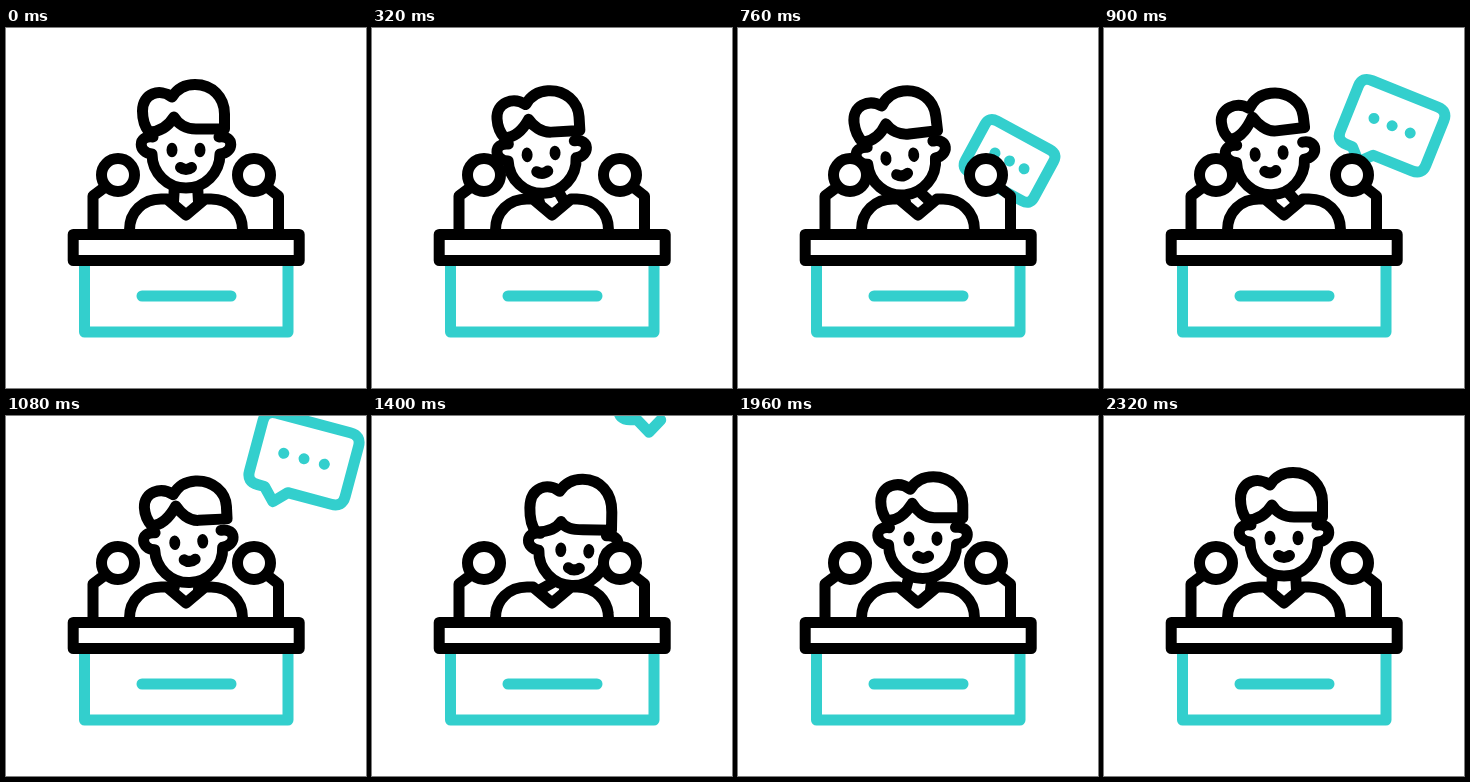
An HTML page for the animation above (2400 ms loop, 360 px wide and 360 px high).

```html
<!DOCTYPE html>
<html lang="en">
<head>
<meta charset="utf-8">
<title>Speaker at a podium</title>
<style>
html, body { margin: 0; width: 100%; height: 100%; overflow: hidden; background: #fff; }
svg { display: block; width: 100vw; height: 100vh; }
path, circle, rect { fill: #fff; stroke: #000; stroke-width: 11; stroke-linecap: round; stroke-linejoin: round; vector-effect: non-scaling-stroke; }
.teal { stroke: #33cfcd; }
.line { fill: none; }
.solid ellipse { fill: #000; }
</style>
</head>
<body>
<svg viewBox="0 0 360 360">
  <g id="bubble">
    <path id="frame" class="teal" d="M-38-37H38Q49.500-37 49.500-26V26Q49.500 37 38 37H-7L-19 49.500L-31 37H-38Q-49.500 37-49.500 26V-26Q-49.500-37-38-37"/>
    <path class="teal line" d="M-21 0h.01M0 0h.01M21 0h.01"/>
  </g>
  <path d="M123.500 206V202C123.500 184 137 171 155 171H161L180 187L199 171H205C223 171 236.500 184 236.500 202V206"/>
  <path id="neck" class="line"/>
  <path id="head" d="M147 109C131 107 132 125 146 126A34 34 0 0 0 214 126C228 125 229 107 213 109"/>
  <g id="face" class="solid">
    <ellipse cx="166" cy="122" rx="5.5" ry="7.3"/>
    <ellipse cx="194" cy="122" rx="5.5" ry="7.3"/>
    <path class="line" d="M174.500 139.500Q180 143.500 185.500 139.500"/>
  </g>
  <path id="hair"/>
  <path class="line" d="M99 159L87 168V206M261 159L272.500 168V206"/>
  <circle cx="112" cy="147" r="16.500"/>
  <circle cx="248" cy="147" r="16.500"/>
  <path class="teal" d="M78.500 234V304H282V234"/>
  <path class="teal line" d="M136 268H225"/>
  <rect x="67.200" y="206.500" width="226" height="26"/>
</svg>
<script>
const LOOP = 2400;
const $ = id => document.getElementById(id);

// Smooth curve through keys that never overshoots them
function track(times, values) {
  const last = times.length - 1;
  const slope = i => (values[i + 1] - values[i]) / (times[i + 1] - times[i]);
  const tangent = i => {
    if (i === 0 || i === last) return 0;
    const a = slope(i - 1), b = slope(i);
    return a * b <= 0 ? 0 : 2 * a * b / (a + b);
  };
  return t => {
    if (t <= times[0]) return values[0];
    if (t >= times[last]) return values[last];
    let i = 0;
    while (t > times[i + 1]) i++;
    const h = times[i + 1] - times[i], u = (t - times[i]) / h, v = 1 - u;
    return v * v * (1 + 2 * u) * values[i] + u * u * (3 - 2 * u) * values[i + 1]
      + h * u * v * (v * tangent(i) - u * tangent(i + 1));
  };
}

const poses = [0, 280, 580, 900, 1080, 1400, 1680, 2220];
const pose = (...v) => track(poses, v);
const hairX = pose(0, -10, -22, -20, 1.5, 21.5, 16.5, 0);
const hairTurn = pose(0, -3, -6, -7, -3, 1, 0, 0);
const crownY = pose(0, 7, 4, 10, 9, 6.5, 9, 0);
const faceX = pose(0, -9, -19, -14.5, 3, 22.5, 14.5, 0);
const faceY = pose(0, 3, 11, 3.5, 4, 12.5, 3, 0);
const faceTurn = pose(0, -3, -12, -4, -3, 3, -1, 0);

const flight = [400, 580, 900, 1080, 1400, 1660];
const fly = (...v) => track(flight, v);
const bubbleX = fly(208, 242, 288, 298, 296, 292);
const bubbleY = fly(222, 176, 98, 43, -33, -100);
const bubbleTurn = fly(44, 37, 22, 15, 0, -8);
const bubbleSize = fly(0.1, 0.5, 0.93, 1, 1, 1);
const frameLength = $("frame").getTotalLength();

const place = (id, value) => $(id).setAttribute("transform", value);
const shape = (id, d) => $(id).setAttribute("d", d);

// Crown, fringe ends and fringe peak drop by different amounts in a nod
function hairPath(top, ends, peak) {
  const side = (top + ends) / 2;
  return `M143 ${104 + ends}C139 ${99 + ends} 136.5 ${92 + side} 136.5 ${83 + side}
    C136.5 ${65 + top} 154 ${60 + top} 166 ${69 + top}
    C171 ${61 + top} 179 ${56.5 + top} 189 ${56.5 + top}
    C206 ${56.5 + top} 218.5 ${69 + top} 218.5 ${86 + side}V${101 + ends}
    H190C180 ${101 + ends} 172 ${96 + peak} 168 ${89 + peak}
    C163 ${97 + peak} 155 ${104 + ends} 143 ${104 + ends}Z`;
}

function drawHead(t) {
  const fx = faceX(t), fy = faceY(t), top = crownY(t), turn = faceTurn(t);
  const x = fx * 0.92, y = (fy + top) / 2;

  place("head", `translate(${x} ${y}) rotate(${turn * 0.7} 180 130)`);
  place("face", `translate(${fx} ${fy}) rotate(${turn} 180 128)`);
  place("hair", `translate(${hairX(t)} 0) rotate(${hairTurn(t)} 178 85)`);
  shape("hair", hairPath(top, fy, fy + 0.7 * (fy - top)));
  shape("neck", `M${168.5 + x * 0.6} ${157 + y}L167.5 174M${191.5 + x * 0.6} ${157 + y}L192.5 174`);
}

function drawBubble(t) {
  $("bubble").style.display = t > 400 && t < 1640 ? "" : "none";
  place("bubble", `translate(${bubbleX(t)} ${bubbleY(t)}) rotate(${bubbleTurn(t)}) scale(${bubbleSize(t)})`);

  // The outline runs out along its own path while it leaves
  const gone = frameLength * Math.min(1, (t - 1080) / 520);
  $("frame").style.strokeDasharray = gone > 0 ? `0 ${gone} ${frameLength} 0` : "none";
}

function draw(t) {
  drawHead(t);
  drawBubble(t);
}

const start = performance.now();
function tick() {
  draw((performance.now() - start) % LOOP);
  requestAnimationFrame(tick);
}
draw(0);
requestAnimationFrame(tick);
</script>
</body>
</html>
```
